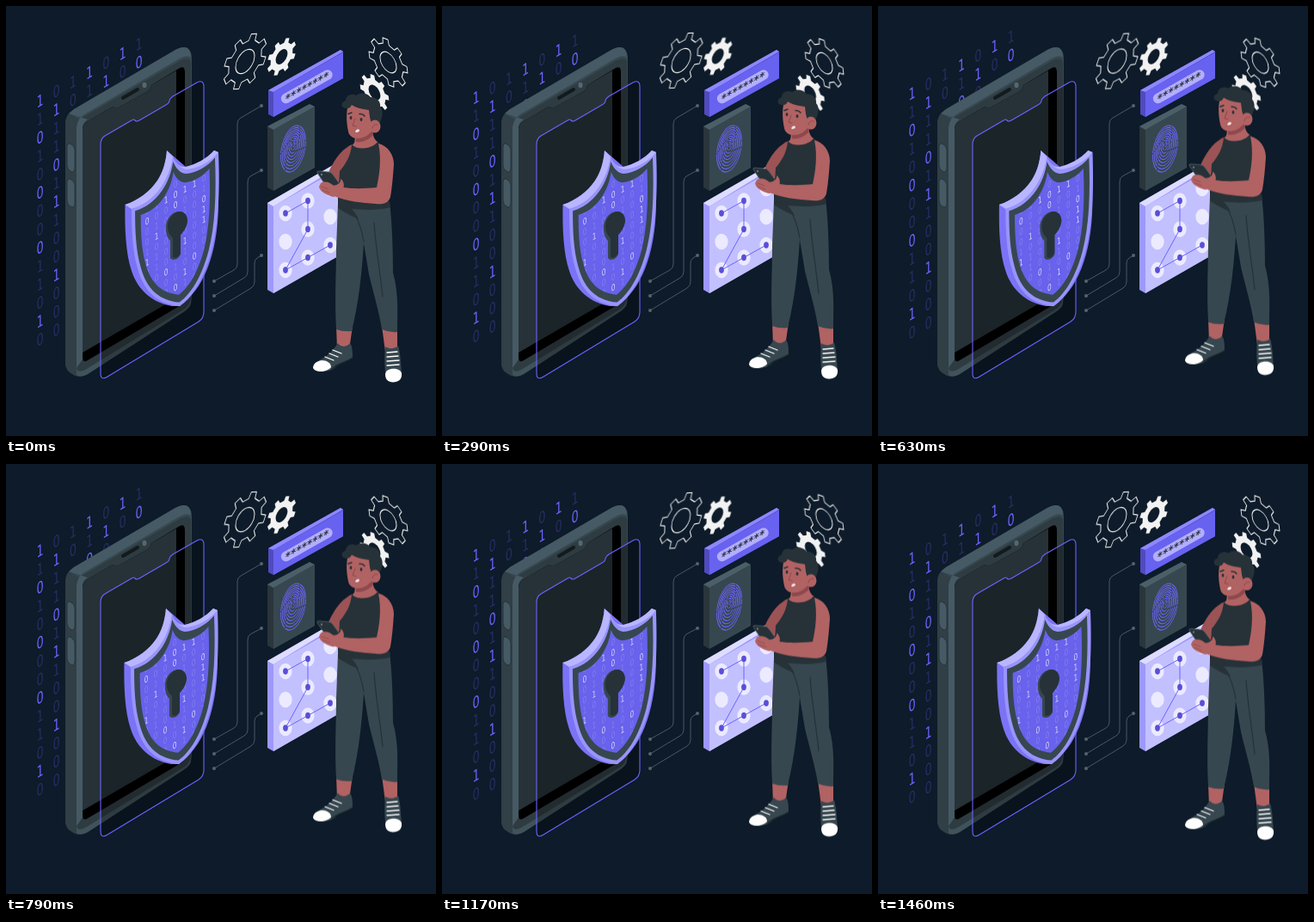
Animation, 500 px wide and 500 px high, one loop 1500 ms. Source, as an HTML page:

```html
<!DOCTYPE html>
<html lang="en">
<head>
<meta charset="utf-8">
<title>Phone security</title>
<style>
html, body { margin: 0; width: 100%; height: 100%; overflow: hidden; background: #0d1b2a; }
svg { display: block; width: 100vw; height: 100vh; }
text { font-family: "DejaVu Sans", sans-serif; text-anchor: middle; }
.float { animation: float 1.5s linear infinite; }
.shake { animation: shake 1.5s cubic-bezier(.36, .07, .19, .97) infinite; }
.sway { animation: sway 1.5s linear infinite; transform-origin: 360px 77px; }
@keyframes float { 50% { transform: translateY(-10px); } }
@keyframes sway {
  0%, 100% { transform: rotate(0deg); }
  25% { transform: rotate(1deg); }
  75% { transform: rotate(-1deg); }
}
@keyframes shake {
  0%, 100% { transform: translateX(0); }
  10%, 90% { transform: translateX(-1px); }
  20%, 80% { transform: translateX(2px); }
  30%, 50%, 70% { transform: translateX(-4px); }
  40%, 60% { transform: translateX(4px); }
}
.skin { fill: #b16263; }
.dark { fill: #263238; }
.slate { fill: #37474f; }
.line { fill: none; stroke-linecap: round; stroke-linejoin: round; }
</style>
</head>
<body>
<svg viewBox="0 0 500 500">
  <defs>
    <path id="plate" d="M194 175C198 184 203 189 210 190C223 189 238 181 247 170C249 215 247 255 239 285C230 318 217 338 202 349C179 347 161 335 153 305C147 285 146 260 146 236C159 232 171 224 180 211C187 201 192 189 194 175Z"/>
    <clipPath id="face"><use href="#plate" transform="translate(197 275) scale(.79 .82) translate(-197 -275)"/></clipPath>
  </defs>

  <g id="rain" class="float"></g>

  <g id="phone">
    <path class="slate" d="M69 138Q69 126 79 120L197 51Q206 46 211 49Q216 52 216 61V338Q216 350 206 356L95 428Q86 433 78 428Q69 424 69 415Z"/>
    <path d="M69 138Q69 130 73 125L85 132Q82 136 82 143V424Q82 429 85 431Q81 431 77 428Q69 424 69 415Z" fill="#313f46"/>
    <path d="M82 143Q82 134 90 129L200 65Q212 58 215 64V338Q215 348 206 353L94 425Q82 431 82 421Z" fill="#2e3c42"/>
    <path d="M73 125L79 120L197 51Q206 46 211 49Q215 52 215 60Q211 56 202 61L91 126Q83 131 82 141V421L89 411V142Q89 136 95 132Z" fill="#455a64"/>
    <path d="M82 419Q82 428 92 423L208 352Q215 346 215 338V346Q214 351 206 356L95 428Q86 433 82 429Z" fill="#40525a"/>
    <path d="M89 144Q89 137 95 134L124 117L129 119L165 99Q168 97 169 92L202 72Q208 69 208 77V339Q208 345 203 348L95 412Q89 416 89 408Z" fill="#000"/>
    <path class="dark" d="M89 144Q89 137 95 134L124 117L129 119L165 99Q168 97 169 92L198 75V334Q198 339 194 342L89 403Z"/>
    <path class="line" d="M136 107L153 97" stroke="#131a1d" stroke-width="4"/>
    <ellipse cx="161" cy="92" rx="2.5" ry="3.2" fill="#55676f"/>
    <g fill="#455a64" stroke="#1f2a2f" stroke-width=".7">
      <path d="M71 163Q72 158 76 161Q80 163 80 168V189Q79 195 75 192Q71 190 71 185Z"/>
      <path d="M71 204Q72 199 76 202Q80 204 80 209V230Q79 236 75 233Q71 231 71 226Z"/>
    </g>
    <path d="M110 161Q110 154 115 151L146 133Q149 131 150 133Q152 135 155 133L186 115Q190 113 190 110Q191 107 194 105L222 89Q230 85 230 94V356Q230 363 224 367L118 431Q110 436 110 427Z" fill="#000" fill-opacity=".28" stroke="#6c63ff" stroke-width="1.1"/>
  </g>

  <g class="line" stroke="#4b5965" stroke-width="1">
    <path d="M297 116L273 130Q269 132 269 137V300Q269 305 265 307L242 320"/>
    <path d="M297 191L284 198Q281 200 281 205V309Q281 314 277 316L242 337"/>
    <path d="M297 290L292 293Q289 295 289 299V321Q289 325 285 328L242 354"/>
  </g>
  <g id="ends" fill="#56636d"></g>

  <g id="shield" class="shake">
    <path d="M138.500 231C154 226 167 216 176 203C182 194 186 182 187 168L194 174L209 187C221 184 233 178 242 168L247 170V232C246 290 229 330 202 349L193 349C170 345 153 330 146 308C139 287 138 258 138.500 231Z" fill="#7a73f7"/>
    <path d="M138.500 231C154 226 167 216 176 203C182 194 186 182 187 168L194 175C196 182 202 188 209 187C221 184 233 178 242 168L247 170C239 184 223 192 210 191C203 190 198 185 194 177C191 198 175 230 146 236Z" fill="#b9b5ff"/>
    <use href="#plate" fill="#9994fb"/>
    <use href="#plate" class="slate" transform="translate(197 275) scale(.92 .94) translate(-197 -275)"/>
    <g clip-path="url(#face)">
      <path d="M140 160H260V360H140Z" fill="#6862ec"/>
      <g id="code"></g>
    </g>
    <path class="slate" d="M186 259C185 250 191 241 199 239C207 238 211 244 211 250C210 257 207 262 203 266V289C200 295 194 297 191 293V273C188 270 186 265 186 259Z"/>
    <path class="dark" d="M188 256C188 247 195 239 203 239C209 240 211 245 211 250C210 257 207 262 203 266V287C201 292 197 294 194 292V270C190 266 188 262 188 256Z"/>
  </g>

  <g id="cards">
    <path d="M305 98L389 51L392 53V84L311 129L305 126Z" fill="#504abf"/>
    <path d="M305 98L389 51L392 53L311 100Z" fill="#8e87ff"/>
    <path d="M311 100L392 54V84L311 129Z" fill="#6862f0"/>
    <path class="line" d="M325.500 107.500L374 80" stroke="#b3aeff" stroke-width="11.500"/>
    <g id="stars" class="dark"></g>

    <path d="M304 140L353 114L359 117V188L311 215L304 211Z" fill="#2a363c"/>
    <path d="M304 140L353 114L359 117L311 144Z" fill="#4b5f69"/>
    <path class="slate" d="M311 144L359 117V188L311 215Z"/>
    <g id="print" class="line" stroke="#6c63ff" transform="matrix(.866 -.5 0 1 334 166)"></g>

    <path d="M304 229L382 184L386 187V291L311 334L304 330Z" fill="#9d98fb"/>
    <path d="M304 229L382 184L386 187L311 233Z" fill="#dedcff"/>
    <path d="M311 233L386 190V291L311 334Z" fill="#c3c0ff"/>
    <g id="dots"></g>
    <path class="line" d="M325 241L351 226.500V259.500L325 307L377 278" stroke="#6c63ff" stroke-width="1"/>
    <g id="marks" fill="#5850d6"></g>
  </g>

  <g id="gears" class="sway"></g>

  <g id="person" class="float">
    <!-- legs and shoes -->
    <path class="skin" d="M384 372H403L399 400H385ZM437 372H455L455 402H441Z"/>
    <path class="slate" d="M386 392C389 397 396 397 400 392C403 396 403 402 403 409C397 414 390 414 383 420C378 425 367 427 358 423C357 419 359 415 364 412C373 408 380 401 386 392Z"/>
    <path d="M357 421C357 416 361 413 367 412C373 412 378 415 378 420C373 426 360 427 357 421Z" fill="#fff"/>
    <path class="line" d="M379 422C385 415 397 414 403 409" stroke="#1c262b" stroke-width="1.3"/>
    <path class="line" d="M380 400L390 404M376 404L386 408M371 408L381 412" stroke="#fff" stroke-width="1.3"/>
    <path class="slate" d="M441 396C445 399 452 399 456 395C459 405 459 416 460 427L441 426C440 416 440 406 441 396Z"/>
    <path d="M441 428C442 420 458 420 460 427C461 434 456 437.500 450 437.500C444 437.500 441 434 441 428Z" fill="#fff"/>
    <path class="line" d="M443 403L455 402M443 408L456 407M443 413L457 412M443 418L457 417" stroke="#fff" stroke-width="1.3"/>
    <path class="slate" d="M386 229L446 228C449 252 450 284 450 310C457 335 455 358 455 379Q446 380 437 376C434 356 427 333 422 312L416 276C414 306 411 342 402 378Q392 379 384 376C382 340 384 310 384 282Z"/>
    <path class="line" d="M416 274C414 262 411 252 406 243M428 252C430 282 436 316 438 338" stroke="#263238" stroke-width="1.2"/>
    <path class="dark" d="M386 229L446 227L447 234C432 238 416 237 402 236C405 239 408 243 410 248C402 244 393 240 386 235Z"/>

    <!-- torso, arms and handset -->
    <path d="M405 160C390 165 380 181 373 198L381 207C386 206 392 202 396 194Z" fill="#9c5355"/>
    <path class="dark" d="M402 161C413 166 424 164 432 157L438 164V229C422 234 402 234 386 230L388 192C395 184 401 174 402 161Z"/>
    <path class="skin" d="M433 160C443 162 451 172 451 184C450 198 449 210 447 222C445 229 439 231 430 230C414 229 396 227 381 221C374 219 367 217 366 212C364 206 370 203 376 206C381 207 388 210 393 211C406 213 420 212 431 211C434 198 437 178 433 160Z"/>
    <path class="dark" d="M362 194Q361 192 364 192L375 193Q378 193 380 196L388 207Q389 209 386 209H375Q372 209 370 206Z" stroke="#53636b" stroke-width=".8"/>
    <circle cx="367" cy="196" r="1.200" fill="#65757d"/>
    <path class="skin" d="M366 206C371 203 377 205 381 209C386 208 390 205 389 201C394 204 394 212 390 215L381 222C373 220 365 216 364 210Z"/>
    <path class="line" d="M367 210L375 213M368 214L376 217" stroke="#8d494c" stroke-width=".8"/>

    <!-- head -->
    <path class="skin" d="M404 143L427 141C426 149 427 154 432 158C426 166 410 168 403 162C407 158 406 151 404 143Z"/>
    <path d="M407 153C414 154 421 150 426 145L427 150C421 156 414 159 407 158Z" fill="#8d494c"/>
    <path class="skin" d="M398 114C407 110 424 115 427 126C430 138 425 150 415 153C406 156 399 152 398 146C396 136 395 126 398 114Z"/>
    <path class="dark" d="M398 119C389 120 388 112 395 110C395 104 402 101 407 104C413 99 421 102 424 106C432 106 436 112 435 117C440 122 437 132 434 137L426 137C423 133 423 128 422 121C414 120 406 118 402 115C401 117 400 118 398 119Z"/>
    <ellipse class="skin" cx="429" cy="140" rx="6.500" ry="7.500"/>
    <path class="line" d="M426 142C427 138 430 137 432 138" stroke="#8d494c" stroke-width="1"/>
    <g class="dark"><ellipse cx="401" cy="130" rx="1.400" ry="2"/><ellipse cx="413" cy="132" rx="1.400" ry="2"/></g>
    <path class="line" d="M398 125.500L402 124M411 125.500Q415 125 417 128" stroke="#263238" stroke-width="1.500"/>
    <path class="line" d="M406 131L403 139L407 140" stroke="#8d494c" stroke-width="1"/>
    <path d="M406 146Q408 142 411 144Q411 147 407 147Z" fill="#f3e4e4"/>
  </g>
</svg>
<script>
const NS = "http://www.w3.org/2000/svg";
const $ = id => document.getElementById(id);

function add(parent, tag, attrs, label) {
  const node = document.createElementNS(NS, tag);
  for (const key in attrs) node.setAttribute(key, attrs[key]);
  if (label) node.textContent = label;
  return parent.appendChild(node);
}

function digit(parent, char, x, y, size, fill, opacity) {
  add(parent, "text", {
    transform: `matrix(.7 -.404 0 1 ${x} ${y + size * .36})`,
    "font-size": size, fill, opacity
  }, char);
}

// Columns behind the phone: digits, then the rows that glow
const columns = [
  ["11010000011010", [0, 2, 5, 8, 12]],
  ["01110111001000", [1, 4, 6, 10]],
  ["10", []],
  ["110", [0, 2]],
  ["010", [1]],
  ["10", [0]],
  ["10", [1]]
];
columns.forEach(([digits, lit], c) => [...digits].forEach((char, r) =>
  digit($("rain"), char, 39.5 + c * 19.2, 110 - c * 11 + r * 21.35, 18.5,
    "#6c63ff", lit.includes(r) ? 1 : .26)));

// Columns on the shield: row to glowing digit
const glow = [
  { 0: "0", 4: "1" },
  { 2: "1" },
  { "-1": "1", 6: "0" },
  { "-1": "0", 0: "0", 8: "0" },
  { "-1": "1", 4: "1", 7: "1" },
  { "-1": "1", 6: "0" },
  { 1: "0", 2: "1", 3: "1" }
];
glow.forEach((lit, c) => {
  for (let r = -2; r < 11; r++) {
    const char = lit[r] || String((c * 5 + r * r + 40) % 3 % 2);
    digit($("code"), char, 164 + c * 11, 250 - c * 6.3 + r * 12, 10.5,
      "#e4e2ff", lit[r] ? .9 : .22);
  }
});

for (const [x, y] of [[297, 116], [297, 191], [297, 290], [242, 320], [242, 337], [242, 354]])
  add($("ends"), "circle", { cx: x, cy: y, r: 2 });

for (let i = 0; i < 8; i++)
  add($("stars"), "text", {
    transform: `matrix(.866 -.5 0 1 ${328 + i * 6.3} ${111.5 - i * 3.55})`,
    "font-size": 13, "font-weight": "bold"
  }, "*");

// Fingerprint ridges with shifting gaps
for (let i = 0; i < 9; i++) {
  const rx = 1.5 + i * 1.9, ry = 2.5 + i * 2.9;
  add($("print"), "ellipse", {
    rx, ry, cy: (8 - i) * -.6,
    "stroke-dasharray": `${ry * 1.5} 2 ${ry * .8} 2.2`,
    "stroke-dashoffset": i * 7
  });
}

const spot = (c, r) => ({ cx: 325 + c * 26, cy: 241 - c * 14.5 + r * 33 });
for (let i = 0; i < 9; i++)
  add($("dots"), "ellipse", { ...spot(i % 3, i / 3 | 0), rx: 7.6, ry: 9.3, fill: "#eceaff" });
for (const [c, r] of [[0, 0], [1, 0], [1, 1], [0, 2], [1, 2], [2, 2]])
  add($("marks"), "ellipse", { ...spot(c, r), rx: 2.9, ry: 3.7 });

// Eight-toothed gear on an isometric plane; lean is the plane's slope
function gear(x, y, radius, hole, lean, phase, solid) {
  const step = Math.PI / 4, root = radius * .77;
  let d = "";
  for (let i = 0; i < 8; i++)
    for (const [a, r] of [[-.27, root], [-.17, radius], [.17, radius], [.27, root]]) {
      const t = (i + phase + a) * step;
      d += `${d ? "L" : "M"}${(r * Math.cos(t)).toFixed(2)} ${(r * Math.sin(t)).toFixed(2)}`;
    }
  d += `ZM${hole} 0A${hole} ${hole} 0 1 0 ${-hole} 0A${hole} ${hole} 0 1 0 ${hole} 0Z`;
  add($("gears"), "path", {
    d, transform: `matrix(.866 ${lean} 0 1 ${x} ${y})`, "fill-rule": "evenodd",
    fill: solid ? "#f2f2f2" : "none", stroke: solid ? "none" : "#f2f2f2",
    "stroke-width": 1.1, "stroke-linejoin": "round"
  });
}
gear(278, 64.5, 29, 12.7, -.5, .55, false);
gear(320.5, 59, 19.5, 8, -.5, .55, true);
gear(444.5, 65.5, 26, 11, .5, .8, false);
gear(428.5, 100.5, 19.5, 8, .5, .8, true);
</script>
</body>
</html>
```
